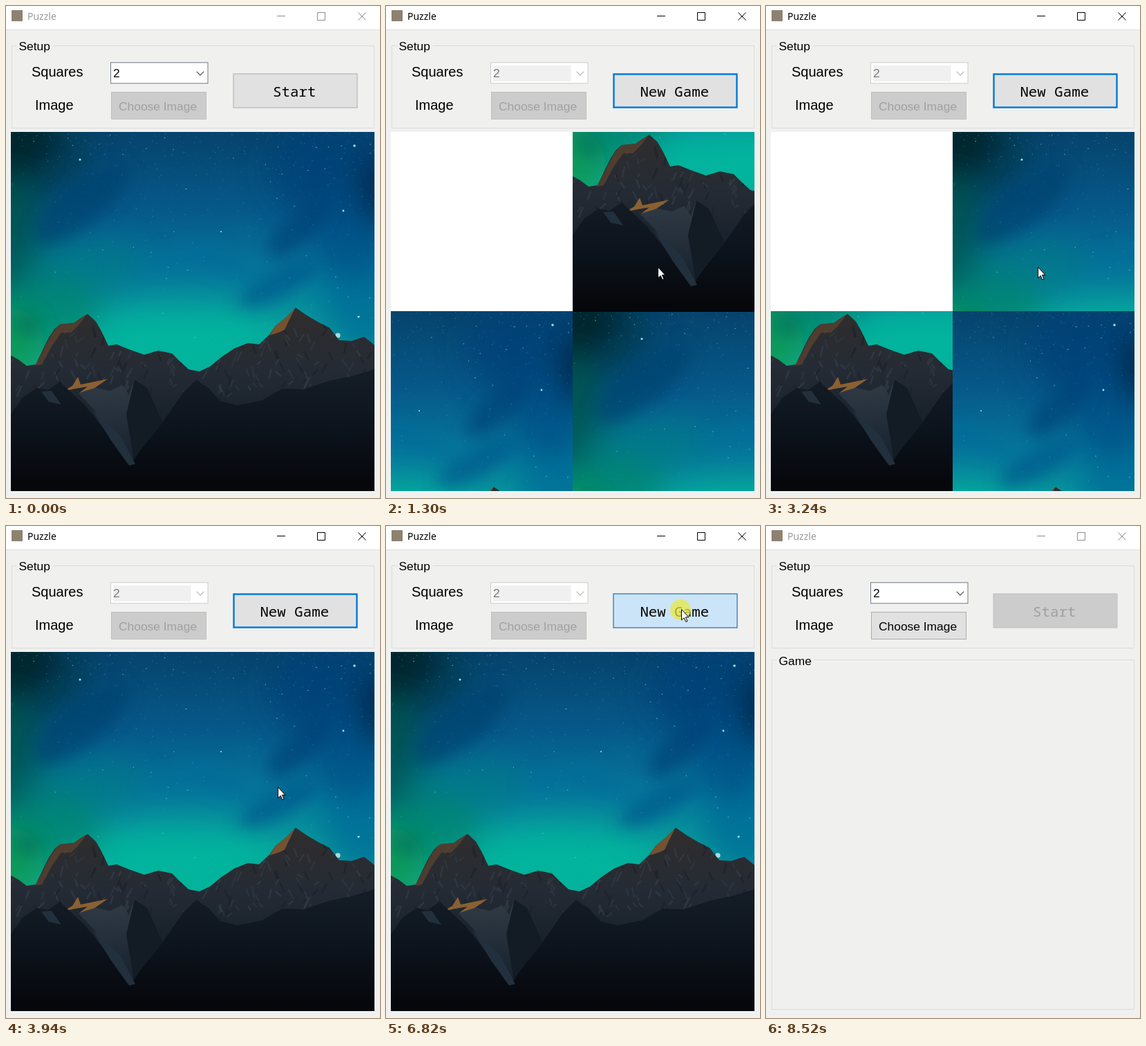
An HTML page that plays this animation: 541 by 711 pixels, repeating every 8600 ms.

```html
<!DOCTYPE html>
<html lang="en">
<head>
<meta charset="utf-8">
<title>Puzzle</title>
<style>
html, body { margin: 0; width: 100%; height: 100%; overflow: hidden; background: #f0f0ef; }
svg { display: block; }
#stage { width: 541px; height: 711px; }
text { font-family: "Liberation Sans", Arial, sans-serif; font-size: 17.4px; fill: #000; white-space: pre; }
.label { font-size: 20px; }
.mono { font-family: "Noto Sans Mono", monospace; font-size: 20.8px; text-anchor: middle; }
.title { font-family: "Noto Sans", "Open Sans", sans-serif; font-size: 14px; }
.frame { fill: none; stroke: #dcdcdc; }
</style>
</head>
<body>
<svg id="stage" viewBox="0 0 541 711" xmlns="http://www.w3.org/2000/svg">
  <defs>
    <linearGradient id="sky" x1="0" y1="0" x2="0" y2="1">
      <stop offset="0" stop-color="#06436c"/>
      <stop offset=".22" stop-color="#06598a"/>
      <stop offset=".4" stop-color="#067a9c"/>
      <stop offset=".55" stop-color="#08a09c"/>
      <stop offset=".68" stop-color="#08ae98"/>
    </linearGradient>
    <linearGradient id="rock" gradientUnits="userSpaceOnUse" x1="0" y1="440" x2="0" y2="610">
      <stop offset="0" stop-color="#302d2d"/>
      <stop offset=".5" stop-color="#252b34"/>
      <stop offset="1" stop-color="#16202b"/>
    </linearGradient>
    <linearGradient id="front" gradientUnits="userSpaceOnUse" x1="0" y1="535" x2="0" y2="690">
      <stop offset="0" stop-color="#141c26"/>
      <stop offset=".5" stop-color="#0c131c"/>
      <stop offset="1" stop-color="#06070b"/>
    </linearGradient>
    <linearGradient id="gully" gradientUnits="userSpaceOnUse" x1="0" y1="550" x2="0" y2="664">
      <stop offset="0" stop-color="#2f3944"/>
      <stop offset="1" stop-color="#15202c"/>
    </linearGradient>
    <filter id="soft" filterUnits="userSpaceOnUse" x="-80" y="100" width="700" height="680">
      <feGaussianBlur stdDeviation="22"/>
    </filter>
    <filter id="haze" filterUnits="userSpaceOnUse" x="-80" y="100" width="700" height="680">
      <feGaussianBlur stdDeviation="11"/>
    </filter>
    <clipPath id="ridgeClip"><path id="ridgeEdge"/></clipPath>
    <g id="photo">
      <rect x="7" y="182" width="526" height="519" fill="url(#sky)"/>
      <g id="glow" filter="url(#soft)"/>
      <g id="clouds" filter="url(#haze)"/>
      <g id="stars" fill="none"/>
      <path id="ridge" fill="url(#rock)"/>
      <g clip-path="url(#ridgeClip)">
        <g id="facets" fill="none"/>
        <path fill="#5f4531" opacity=".7" d="M118 444L98 456 78 459 66 474 42 520 52 518 66 492 80 472 94 472 106 460Z"/>
        <path fill="#80592f" opacity=".85" d="M419 435L404 450 390 461 381 476 394 472 403 468 409 455Z"/>
        <path fill="url(#gully)" d="M105 560L122 550 150 556 168 548 178 562 186 540 200 560 182 590 186 664 176 662 150 622 128 584Z"/>
        <path fill="#131b25" d="M186 540L204 552 226 600 186 662 174 590Z"/>
        <path fill="#8a6032" d="M82 557L96 549 104 536 108 547 147 539 128 552 106 559 118 550 100 553Z"/>
      </g>
      <path id="near" fill="url(#front)"/>
      <path fill="#22303d" d="M51 557L66 556 80 576 62 572ZM124 583L146 602 165 620 187 662 178 664 152 628Z"/>
    </g>
  </defs>

  <rect width="541" height="711" fill="#f0f0ef"/>
  <rect width="541" height="34" fill="#fff"/>
  <path d="M0 34.5H541" stroke="#dcdcdc"/>
  <rect x="8" y="6" width="16" height="16" fill="#8d8270"/>
  <text id="title" class="title" x="31" y="20">Puzzle</text>
  <path id="winButtons" fill="none" d="M392 14.5H404M450.5 9.5H461.5V20.5H450.5ZM509.5 9.5L520.5 20.5M520.5 9.5L509.5 20.5"/>

  <path class="frame" d="M16 57.5H8.5V176.5H532.5V57.5H68"/>
  <text x="18.5" y="64">Setup</text>
  <text class="label" x="37" y="101.5">Squares</text>
  <text class="label" x="42" y="150">Image</text>

  <rect id="combo" x="151.5" y="81.8" width="140.5" height="30" fill="#fff"/>
  <rect id="comboFill" x="155" y="86" width="112.5" height="23" fill="#f0f0f0"/>
  <text id="comboText" x="155" y="103">2</text>
  <path id="chevron" d="M275.8 94.8L281 100 286.2 94.8" fill="none" stroke-width="1.3"/>

  <rect id="choose" x="152.5" y="124.5" width="137" height="39"/>
  <text id="chooseText" x="163" y="150.5">Choose Image</text>

  <rect id="button"/>
  <text id="buttonText" class="mono" x="417.3" y="130.5"></text>

  <g id="group">
    <path class="frame" d="M16 193.5H8.5V698.5H532.5V193.5H70"/>
    <text x="18.5" y="200.5">Game</text>
  </g>
  <g id="board">
    <rect x="7" y="182" width="526" height="519" fill="#fff"/>
  </g>

  <circle id="press" r="15" fill="#e9e93c" opacity=".72"/>
  <path id="cursor" d="M.5 .5V16L4.2 12.7 6.8 18.5 9 17.5 6.5 11.8H11Z" fill="#fff" stroke="#000"/>
</svg>
<script>
const LOOP = 8600, TILE_W = 263, TILE_H = 259;
const NS = "http://www.w3.org/2000/svg";
const $ = id => document.getElementById(id);

function set(el, attrs) {
  for (const k in attrs) el.setAttribute(k, attrs[k]);
  return el;
}
function add(parent, tag, attrs) {
  return parent.appendChild(set(document.createElementNS(NS, tag), attrs));
}
function show(id, on) { $(id).style.display = on ? "" : "none"; }

let seed = 11;
function rnd() {
  seed = (seed * 16807) % 2147483647;
  return seed / 2147483647;
}

function blob(parent, cx, cy, rx, ry, fill, opacity, turn = 0) {
  add($(parent), "ellipse", { cx, cy, rx, ry, fill, opacity, transform: `rotate(${turn} ${cx} ${cy})` });
}

function buildSky() {
  blob("glow", 30, 215, 90, 75, "#053648", .6);
  blob("glow", 5, 190, 70, 60, "#042630", .95);
  blob("glow", 0, 330, 55, 85, "#04544e", .85);
  blob("glow", 110, 375, 90, 36, "#067a82", .6);
  blob("glow", 60, 440, 80, 50, "#078468", .7);
  blob("glow", 0, 490, 55, 55, "#0d9a58", .95);
  blob("glow", 250, 485, 140, 50, "#06b89e", .75);
  blob("glow", 525, 425, 70, 80, "#076f98", .85);
  blob("glow", 470, 235, 90, 70, "#053f78", .7);
  blob("glow", 500, 335, 55, 60, "#055088", .8);
  blob("glow", 540, 265, 24, 55, "#03203e", .9);
  blob("clouds", 110, 285, 85, 32, "#054471", .7, -38);
  blob("clouds", 255, 360, 60, 14, "#066f9c", .5, -12);
  blob("clouds", 425, 320, 60, 22, "#05427a", .7, -42);
  blob("clouds", 395, 400, 65, 20, "#055c8e", .75, -28);
  blob("clouds", 310, 372, 55, 14, "#066a9a", .5, 18);
  blob("clouds", 30, 460, 22, 18, "#05705c", .6);

  for (const [count, color, size] of [[420, "#1d7fae", 1], [130, "#3a9cc4", 1.1], [40, "#8fd0dc", 1.3]]) {
    let d = "";
    for (let i = 0; i < count; i++) {
      const x = 8 + 524 * Math.pow(rnd(), .8), y = 184 + 300 * Math.pow(rnd(), 1.7);
      d += `M${x.toFixed(1)} ${y.toFixed(1)}h${size}`;
    }
    add($("stars"), "path", { d, stroke: color, "stroke-width": size, opacity: .7 });
  }
  for (const [cx, cy, r] of [[107, 222, 1.6], [504, 202, 1.8], [488, 296, 1.4], [510, 449, 1.6], [311, 326, 1], [480, 476, 3.6]])
    add($("stars"), "circle", { cx, cy, r, fill: "#a9dcdf" });
}

function buildMountains() {
  const ridge = "M7 505L18 511 30 520 43 518 54 495 62 479 70 467 78 460 98 458 108 451 118 445 130 456 138 470 148 491 " +
    "160 489 180 497 200 504 220 498 240 502 252 514 264 525 280 528 295 521 312 507 330 495 350 487 366 489 " +
    "381 475 390 462 405 450 419 436 435 447 452 457 468 465 482 483 500 484 518 478 533 490V701H7Z";
  set($("ridge"), { d: ridge });
  set($("ridgeEdge"), { d: ridge });
  set($("near"), { d: "M7 590L24 566 44 552 60 555 78 543 94 558 115 578 150 622 180 663 196 640 220 610 236 588 " +
    "255 560 275 540 294 553 310 571 335 577 370 570 400 553 430 554 470 541 500 535 533 525V701H7Z" });
  for (const color of ["#36404b", "#1a2029", "#303b47"]) {
    let d = "";
    for (let i = 0; i < 75; i++) {
      const x = 10 + rnd() * 520, y = 455 + rnd() * 105, lean = rnd() < .5 ? -1 : 1;
      d += `M${x | 0} ${y | 0}l${lean * (3 + rnd() * 6 | 0)} ${5 + rnd() * 12 | 0}`;
    }
    add($("facets"), "path", { d, stroke: color, "stroke-width": 2.5, opacity: .6 });
  }
}

const tiles = {};
const cell = i => ({ x: 7 + (i % 2) * TILE_W, y: 182 + (i >> 1) * TILE_H });

function buildTiles() {
  [..."ABCD"].forEach((name, i) => {
    const { x, y } = cell(i), height = TILE_H + 1;
    const view = add($("board"), "svg", { width: TILE_W, height, viewBox: `${x} ${y} ${TILE_W} ${height}` });
    add(view, "use", { href: "#photo" });
    tiles[name] = view;
  });
}

// Board contents by cell: top left, top right, bottom left, bottom right.
const LAYOUTS = [
  [0, "ABCD"], [995, "_CBA"], [2310, "C_BA"], [2630, "CAB_"], [2940, "CA_B"], [3240, "_ACB"],
  [3640, "A_CB"], [3940, "ABCD"], [4420, "____"], [4720, "ABCD"], [6900, ""]
];

const NORMAL = ["#e1e1e1", "#adadad", 1], HOVER = ["#e5f1fb", "#0078d7", 1];
const PRESSED = ["#cce4f7", "#005499", 1], FOCUS = ["#e1e1e1", "#0078d7", 2.4];
const OFF = ["#cccccc", "#bfbfbf", 1];
const BUTTON = [
  [0, NORMAL, "Start"], [597, HOVER, "Start"], [920, PRESSED, "Start"], [995, HOVER, "New Game"],
  [1148, FOCUS, "New Game"], [5655, HOVER, "New Game"], [6820, PRESSED, "New Game"], [6900, OFF, "Start"]
];

// Pointer runs: start, end, steps, from, to.
const MOVES = [
  [140, 290, 3, 431, 796, 415, 220],
  [520, 750, 4, 415, 220, 420, 122],
  [1072, 1300, 4, 420, 122, 393, 377],
  [5270, 5810, 8, 393, 377, 427, 120],
  [7130, 7510, 6, 427, 120, 560, 720]
];

const at = (list, t) => list.filter(e => e[0] <= t).pop();
const clamp = v => Math.max(0, Math.min(1, v));

function mix(a, b, k) {
  const part = (c, i) => parseInt(c.slice(i, i + 2), 16);
  return "rgb(" + [1, 3, 5].map(i => Math.round(part(a, i) + (part(b, i) - part(a, i)) * k)) + ")";
}

function pointer(t) {
  const move = at(MOVES, t);
  if (!move) return [600, 800];
  const [t0, t1, n, x0, y0, x1, y1] = move;
  const k = Math.min(1, (Math.floor((t - t0) / (t1 - t0) * (n - 1) + 1e-6) + 1) / n);
  return [x0 + (x1 - x0) * k, y0 + (y1 - y0) * k];
}

let shown = null;
function drawBoard(layout) {
  if (layout === shown) return;
  shown = layout;
  show("board", layout);
  show("group", !layout);
  for (const name in tiles) {
    const i = layout.indexOf(name);
    tiles[name].style.display = i < 0 ? "none" : "";
    if (i >= 0) set(tiles[name], cell(i));
  }
}

function drawSetup(t) {
  const combo = t < 995 ? 1 : t < 6900 ? 1 - clamp((t - 995) / 200) : clamp((t - 6900) / 280);
  const choose = clamp((t - 6900) / 280);
  set($("combo"), { stroke: mix("#cccccc", "#707981", combo) });
  set($("comboFill"), { opacity: 1 - combo });
  $("comboText").style.fill = mix("#787878", "#000000", combo);
  set($("chevron"), { stroke: mix("#bfbfbf", "#606060", combo) });
  set($("choose"), { fill: mix("#cccccc", "#e1e1e1", choose), stroke: mix("#bfbfbf", "#adadad", choose) });
  $("chooseText").style.fill = mix("#a0a0a0", "#000000", choose);

  const [, [fill, stroke, width], label] = at(BUTTON, t);
  const fade = t < 6900 ? 1 : clamp((t - 6900) / 200);
  const inset = width > 1 ? .5 : 0;
  set($("button"), {
    x: 329 + inset, y: 98 + inset, width: 179 - 2 * inset, height: 49 - 2 * inset,
    fill: mix(PRESSED[0], fill, fade),
    stroke: mix(PRESSED[1], stroke, fade),
    "stroke-width": width
  });
  $("buttonText").textContent = label;
  $("buttonText").style.fill = t < 6900 ? "#000" : "#a0a0a0";
}

function draw(t) {
  const active = t >= 920 && t < 8520;
  $("title").style.fill = active ? "#000" : "#999";
  set($("winButtons"), { stroke: active ? "#000" : "#8c8c8c" });
  drawSetup(t);
  drawBoard(at(LAYOUTS, t)[1]);
  const [x, y] = pointer(t);
  set($("cursor"), { transform: `translate(${x} ${y})` });
  set($("press"), { cx: x - 1, cy: y + 1 });
  show("press", (t >= 920 && t < 995) || (t >= 6820 && t < 6900));
}

buildSky();
buildMountains();
buildTiles();
const start = performance.now();
function tick() {
  draw((performance.now() - start) % LOOP);
  requestAnimationFrame(tick);
}
tick();
</script>
</body>
</html>
```
